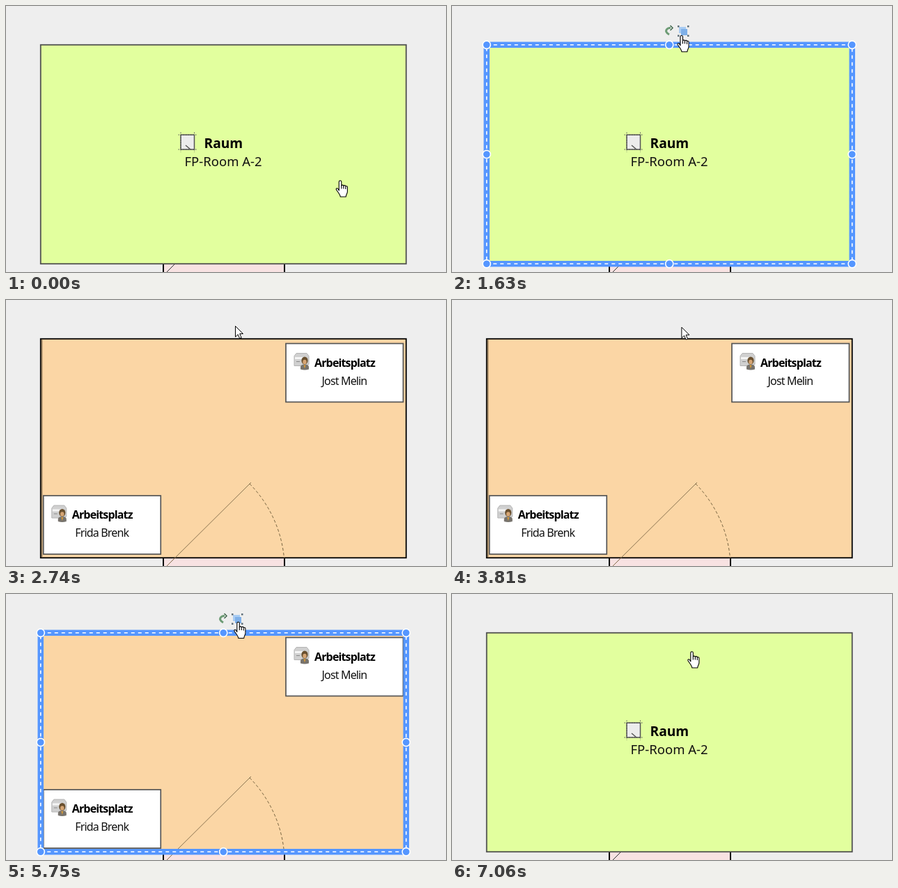
An HTML page that plays this animation: 632x382 px, repeating every 7280 ms.

```html
<!DOCTYPE html>
<html lang="de">
<head>
<meta charset="utf-8">
<title>Room plan</title>
<style>
  html, body { margin: 0; width: 100%; height: 100%; overflow: hidden; background: #eee; }
  svg { display: block; }
  text { font: 18.5px "Noto Sans", "Open Sans", sans-serif; }
  .bold { font-weight: 700; }
  .title { font-size: 19.2px; }
  .desk text { font-size: 16px; letter-spacing: -.85px; }
  .mid { text-anchor: middle; }
</style>
</head>
<body>
<svg width="632" height="382" viewBox="0 0 632 382" fill="none">
  <defs>
    <rect id="box" x="49.75" y="55.75" width="525" height="314.5"/>
    <g id="deskIcon">
      <path d="M12 18 15 14H30L33 18V30L29 32H12z" fill="#d0d0d0" stroke="#b4b4b4"/>
      <path d="M13 21H29" stroke="#f4f4f4" stroke-width="3"/>
      <path d="M15 26H20" stroke="#888"/>
      <path d="M21 37V33Q22 30 27 30Q32 30 33 33V37Q27 39 21 37z" fill="#77736d"/>
      <ellipse cx="27" cy="24.500" rx="4.600" ry="5.500" fill="#69502f"/>
      <ellipse cx="27" cy="26.500" rx="2.700" ry="3.300" fill="#d6a574"/>
      <path d="M25.500 31 27 36 28.500 31z" fill="#d99a35"/>
    </g>
  </defs>

  <rect width="632" height="382" fill="#eee"/>
  <rect x="226" y="370" width="174" height="14" fill="#f8e2e2"/>
  <path d="M226 370V384M400 370V384" stroke="#000" stroke-width="2"/>
  <path d="M231 382 242 371" stroke="#333"/>

  <g id="closed">
    <use href="#box" fill="#e2ff9e" stroke="#505050" stroke-width="1.800"/>
    <rect x="251" y="185" width="19.500" height="21" fill="#ececec" stroke="#555" stroke-width="1.500"/>
    <path d="M247.500 185H274M247.500 206H274M251 181.500V210M270.500 181.500V210" stroke="#555" stroke-dasharray="1.500 2"/>
    <path d="M258 200 265 206" stroke="#555" stroke-width="1.500"/>
    <text class="bold title" x="284.500" y="204" fill="#000">Raum</text>
    <text x="256.500" y="230" fill="#111">FP-Room A-2</text>
  </g>

  <g id="open">
    <use href="#box" fill="#fbd6a5" stroke="#000" stroke-width="1.800"/>
    <path d="M51.750 57V370" stroke="#6d5a40"/>
    <path d="M231 382 352 262" stroke="#8a7350"/>
    <path d="M350 264A175 175 0 0 1 399.500 371" stroke="#75623f" stroke-dasharray="4 3"/>
    <g class="desk" transform="translate(402 62.500)">
      <rect width="168.500" height="84" fill="#fff" stroke="#555" stroke-width="1.700"/>
      <use href="#deskIcon"/>
      <text class="bold" x="41" y="33" fill="#000">Arbeitsplatz</text>
      <text class="mid" x="84" y="59" fill="#111">Jost Melin</text>
    </g>
    <g class="desk" transform="translate(53.750 281)">
      <rect width="168.500" height="84" fill="#fff" stroke="#555" stroke-width="1.700"/>
      <use href="#deskIcon"/>
      <text class="bold" x="41" y="33" fill="#000">Arbeitsplatz</text>
      <text class="mid" x="84" y="59" fill="#111">Frida Brenk</text>
    </g>
  </g>

  <g id="selection">
    <use id="frame" href="#box"/>
    <use href="#box" stroke="#fff" stroke-width="1.600" stroke-dasharray="5 5"/>
    <g id="handles" fill="#5596ff" stroke="#fff" stroke-width="1.600"></g>
    <path d="M312 41Q305 37 309 33Q311 31 314 31.500" stroke="#6d9c75" stroke-width="3"/>
    <path d="M313.500 28 317 31.500 313.500 35" stroke="#41664b" stroke-width="1.500"/>
    <rect x="326" y="30" width="10" height="9" fill="#a9ccf3"/>
    <rect x="329" y="33" width="9" height="9" fill="#7fb0e8"/>
    <path d="M324 28h2.500v2.500h-2.500zM338 28h2.500v2.500h-2.500zM324 41.500h2.500v2.500h-2.500zM338 41.500h2.500v2.500h-2.500z" fill="#5c6d77"/>
  </g>

  <circle id="click" r="12" fill="#fff01e" fill-opacity=".6"/>
  <g id="hand" stroke="#000" stroke-width="1.100" stroke-linejoin="round">
    <path fill="#fff" d="M-1.700 14V1.500A1.750 1.750 0 0 1 1.800 1.500V7.500A1.500 1.500 0 0 1 4.800 7.800A1.500 1.500 0 0 1 7.800 8.500A1.400 1.400 0 0 1 10.400 9.500V15.500C10.400 18.500 8.500 19.500 8.200 23H.3C0 19.500 -3.200 16.500 -5.400 13C-6.400 11 -4.400 10 -3.200 11.500z"/>
    <path d="M1.800 7.500V11.500M4.800 8V11.500M7.800 9V12"/>
  </g>
  <path id="arrow" d="M0 .5V16L3.700 12.500 6.200 18.300 8.700 17.200 6.200 11.500H11z" fill="#fff" stroke="#000" stroke-linejoin="round"/>
</svg>
<script>
const LOOP = 7280, BLUE = [85, 150, 255], BLACK = [0, 0, 0];
const el = id => document.getElementById(id);
const during = (t, a, b) => t >= a && t < b;
const show = (id, on) => el(id).style.display = on ? "" : "none";
const mix = (a, b, p) => a + (b - a) * p;
function ease(t, a, b) {
  const p = Math.min(1, Math.max(0, (t - a) / (b - a)));
  return p * p * (3 - 2 * p);
}

// Pointer moves: start, end, target x, target y, sideways bend
const moves = [
  [660, 1350, 330, 55, 0],
  [1400, 1770, 329.5, 37, 0],
  [3760, 4120, 336, 67, 0],
  [5190, 5570, 333.5, 40.5, -4],
  [6720, 7060, 344.5, 83, 0]
];
const clicks = [[340, 400], [2460, 2560], [4630, 4760], [6270, 6340]];

el("handles").innerHTML = [0, 1, 2].flatMap(i => [0, 1, 2].map(j =>
  i === 1 && j === 1 ? "" :
  `<circle cx="${49.75 + i * 262.5}" cy="${55.75 + j * 157.25}" r="5.6"/>`)).join("");

function pointer(t) {
  let x = 480, y = 251;
  for (const [a, b, tx, ty, bend] of moves) {
    const p = ease(t, a, b);
    x = mix(x, tx, p) + bend * Math.sin(Math.PI * p);
    y = mix(y, ty, p);
  }
  return [x, y];
}

function draw(t) {
  const open = during(t, 2540, 6340);
  show("open", open);
  show("closed", !open);
  show("selection", during(t, 385, 2540) || during(t, 4730, 6340));

  const glow = ease(t, 1430, 1600) - ease(t, 1920, 2150);
  const dark = ease(t, 5750, 5980);
  const color = BLUE.map((c, i) => Math.round(mix(c, BLACK[i], open ? dark : 0)));
  el("frame").setAttribute("stroke", `rgb(${color})`);
  el("frame").setAttribute("stroke-width", open ? mix(8.5, 7, dark) : mix(1.7, 8.5, glow));

  const [x, y] = pointer(t), place = `translate(${x} ${y})`;
  const plain = during(t, 2540, 4120) && y < 55;
  show("arrow", plain);
  show("hand", !plain);
  show("click", clicks.some(([a, b]) => during(t, a, b)));
  for (const id of ["arrow", "hand", "click"]) el(id).setAttribute("transform", place);
}

function tick() {
  draw(performance.now() % LOOP);
  requestAnimationFrame(tick);
}
tick();
</script>
</body>
</html>
```
